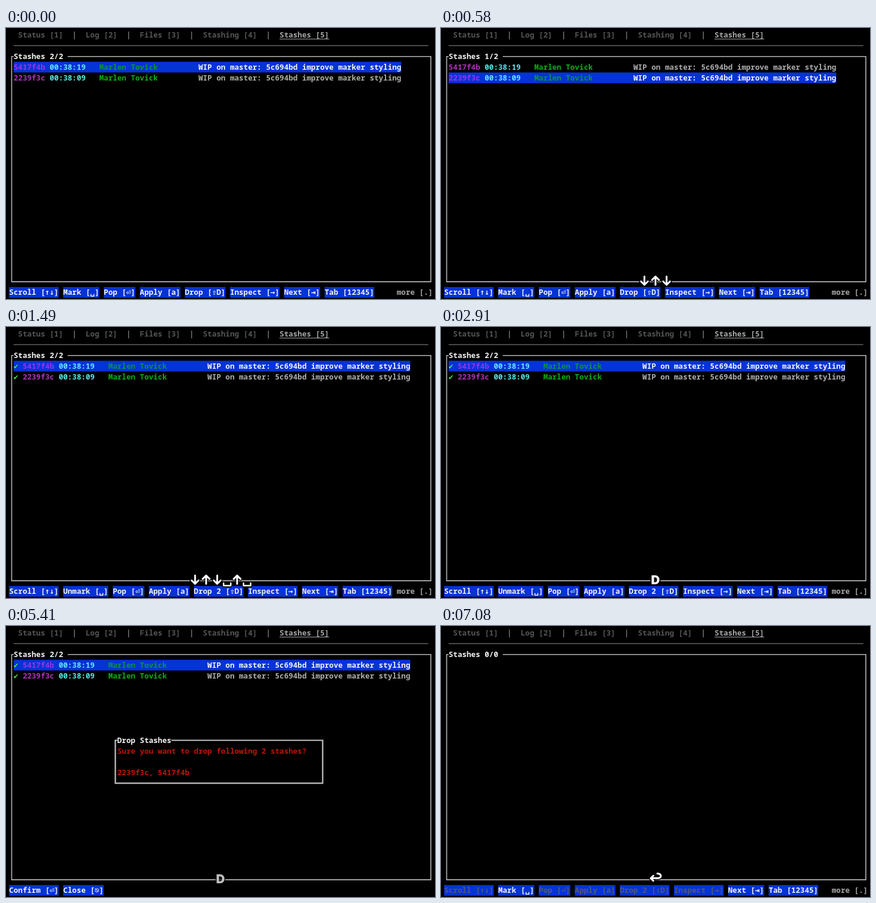
Write an HTML page with a canvas that moves like this. It is 720 px wide and 454 px high and loops after 7180 ms.

```html
<!DOCTYPE html>
<html lang="en">
<head>
<meta charset="utf-8">
<title>Stashes</title>
<style>
html, body { margin: 0; width: 100%; height: 100%; overflow: hidden; background: #000; }
canvas { display: block; }
</style>
</head>
<body>
<canvas id="stage" width="720" height="454"></canvas>
<script>
const ctx = document.getElementById('stage').getContext('2d');
const LOOP = 7180;
const CELL = 7.565, LEFT = 5.2, LINE = 17.97, TOP = 11.6;
const SYMBOL = /[↑↓␣⏎⇧→⇥⎋✔]/;
const BLUE = '#0433d6';

const STASHES = [
  { hash: '5417f4b', time: '00:38:19' },
  { hash: '2239f3c', time: '00:38:09' }
];
const AUTHOR = 'Marlen Tovick';
const MESSAGE = 'WIP on master: 5c694bd improve marker styling';

// Each step changes part of the state from its time on.
const START = { keys: '', sel: 0, marks: [false, false], popup: false, empty: false, fade: 1 };
const STEPS = [
  [80, { keys: '↓' }],
  [160, { sel: 1 }],
  [330, { keys: '↓↑' }],
  [410, { sel: 0 }],
  [500, { keys: '↓↑↓' }],
  [580, { sel: 1 }],
  [1000, { keys: '↓↑↓␣' }],
  [1080, { marks: [false, true] }],
  [1410, { keys: '↓↑↓␣↑', sel: 0 }],
  [1490, { keys: '↓↑↓␣↑␣', marks: [true, true] }],
  [2910, { keys: 'D' }],
  [2990, { popup: true }],
  [5410, { fade: 0.75 }],
  [5490, { fade: 0.5 }],
  [5580, { fade: 0.25 }],
  [5660, { keys: '', fade: 1 }],
  [6910, { keys: '⏎' }],
  [6990, { popup: false }],
  [7080, { empty: true }]
];

const colX = c => LEFT + c * CELL;
const rowY = r => TOP + r * LINE;

function stateAt(t) {
  return Object.assign({}, START, ...STEPS.filter(s => s[0] <= t).map(s => s[1]));
}

function text(str, col, row, color, weight = 600) {
  ctx.fillStyle = color;
  ctx.textAlign = 'center';
  [...str].forEach((ch, i) => {
    if (ch === ' ') return;
    ctx.font = SYMBOL.test(ch)
      ? '700 13px "DejaVu Sans Mono", monospace'
      : `${weight} 12.6px "Noto Sans Mono", "DejaVu Sans Mono", monospace`;
    ctx.fillText(ch, colX(col + i + 0.5), rowY(row) + 4.5);
  });
}

function fillCells(col, row, count, color) {
  ctx.fillStyle = color;
  ctx.fillRect(colX(col), rowY(row) - LINE / 2, count * CELL, LINE);
}

function line(points, color, width) {
  ctx.strokeStyle = color;
  ctx.lineWidth = width;
  ctx.lineCap = 'butt';
  ctx.lineJoin = 'miter';
  ctx.beginPath();
  points.forEach(p => ctx.lineTo(...p));
  ctx.stroke();
}

// Box outline with a gap in the top edge for its title.
function frame(c0, r0, c1, r1, title, gap, color, width) {
  const x0 = colX(c0 + 0.5) + 0.5, x1 = colX(c1 + 0.5) + 0.5;
  const y0 = rowY(r0) + 0.2, y1 = rowY(r1) + 0.2;
  line([[colX(c0 + 1), y0], [x0, y0], [x0, y1], [x1, y1], [x1, y0], [colX(c0 + 1 + gap), y0]], color, width);
  text(title, c0 + 1, r0, '#f4f4f4', 800);
}

function tabs() {
  const names = ['Status', 'Log', 'Files', 'Stashing', 'Stashes'];
  let col = 2;
  names.forEach((name, i) => {
    const label = `${name} [${i + 1}]`;
    const last = i === names.length - 1;
    text(label, col, 0, last ? '#a6a6a6' : '#555');
    if (last) {
      line([[colX(col), 18.5], [colX(col + label.length), 18.5]], '#a6a6a6', 1);
    } else {
      text('|', col + label.length + 2, 0, '#777');
    }
    col += label.length + 5;
  });
  line([[colX(1), 29.5], [colX(93), 29.5]], '#626262', 1.4);
}

function list(s) {
  const title = s.empty ? '0/0' : `${2 - s.sel}/2`;
  frame(0, 2, 93, 23, 'Stashes ' + title, 12, '#b4b4b4', 1.6);
  if (s.empty) return;
  const shift = s.marks.some(Boolean) ? 2 : 0;
  STASHES.forEach((item, i) => {
    const on = i === s.sel, row = 3 + i, col = 1 + shift;
    if (on) fillCells(1, row, 86 + shift, BLUE);
    if (s.marks[i]) text('✔', 1, row, '#48e64c');
    text(item.hash, col, row, on ? '#9a35e2' : '#b232bd');
    text(item.time, col + 8, row, on ? '#64e6ff' : '#55e6e6');
    text(AUTHOR, col + 19, row, on ? '#06963c' : '#08b014');
    text(MESSAGE, col + 41, row, on ? '#f2f2f2' : '#adadad');
  });
}

function commands(s) {
  const marked = s.marks.filter(Boolean).length;
  const live = !s.empty;
  const items = s.popup ? [['Confirm [⏎]', true], ['Close [⎋]', true]] : [
    ['Scroll [↑↓]', live],
    [live && s.marks[s.sel] ? 'Unmark [␣]' : 'Mark [␣]', true],
    ['Pop [⏎]', live],
    ['Apply [a]', live],
    [marked ? `Drop ${marked} [⇧D]` : 'Drop [⇧D]', live],
    ['Inspect [→]', live],
    ['Next [⇥]', true],
    ['Tab [12345]', true]
  ];
  let col = 0;
  for (const [label, on] of items) {
    fillCells(col, 24, label.length, BLUE);
    text(label, col, 24, on ? '#f2f2f2' : '#53587a');
    col += label.length + 1;
  }
  if (!s.popup) text('more [.]', 86, 24, '#a6a6a6');
}

function popup() {
  ctx.fillStyle = '#000';
  ctx.fillRect(colX(23), rowY(10) - 9, 47 * CELL, 5 * LINE);
  frame(23, 10, 69, 14, 'Drop Stashes', 12, '#c4c4c4', 2.2);
  text('Sure you want to drop following 2 stashes?', 24, 11, '#bd1408');
  text('2239f3c, 5417f4b', 24, 13, '#bd1408');
}

function keyPath(key, x) {
  ctx.beginPath();
  if (key === '↓' || key === '↑') {
    const d = key === '↓' ? 1 : -1, y = 423.3;
    ctx.moveTo(x, y - 7 * d);
    ctx.lineTo(x, y + 6.5 * d);
    ctx.moveTo(x - 5.8, y + 1.2 * d);
    ctx.lineTo(x, y + 7 * d);
    ctx.lineTo(x + 5.8, y + 1.2 * d);
  } else if (key === '␣') {
    ctx.moveTo(x - 6, 429);
    ctx.lineTo(x - 6, 433.3);
    ctx.lineTo(x + 6, 433.3);
    ctx.lineTo(x + 6, 429);
  } else {
    ctx.moveTo(x + 3, 414.8);
    ctx.bezierCurveTo(x + 11, 414.6, x + 11, 422.6, x + 3, 422.6);
    ctx.lineTo(x - 7.5, 422.6);
    ctx.moveTo(x - 3.5, 418.4);
    ctx.lineTo(x - 8, 422.6);
    ctx.lineTo(x - 3.5, 426.8);
  }
}

function overlay(keys, alpha) {
  const widthOf = k => k === '␣' ? 14.8 : 18.6;
  const all = [...keys];
  let x = 360 - all.reduce((sum, k) => sum + widthOf(k), 0) / 2;
  ctx.globalAlpha = alpha;
  ctx.lineCap = ctx.lineJoin = 'round';
  const placed = all.map(k => {
    const w = widthOf(k);
    x += w;
    return [k, x - w / 2];
  });
  for (const [color, extra] of [['#000', 3], ['#fff', 0]]) {
    ctx.strokeStyle = ctx.fillStyle = color;
    for (const [k, cx] of placed) {
      if (k === 'D') {
        ctx.font = '900 20.5px Inter, "Open Sans", sans-serif';
        ctx.textAlign = 'center';
        ctx.lineWidth = 4;
        if (extra) ctx.strokeText(k, cx, 431);
        ctx.fillText(k, cx, 431);
      } else {
        ctx.lineWidth = (k === '␣' ? 2.4 : 3) + extra;
        keyPath(k, cx);
        ctx.stroke();
      }
    }
  }
  ctx.globalAlpha = 1;
}

function draw(t) {
  const s = stateAt(t);
  ctx.fillStyle = '#000';
  ctx.fillRect(0, 0, 720, 454);
  tabs();
  list(s);
  commands(s);
  if (s.popup) popup();
  if (s.keys) overlay(s.keys, s.fade);
}

const begin = performance.now();
function tick() {
  draw((performance.now() - begin) % LOOP);
  requestAnimationFrame(tick);
}
tick();
</script>
</body>
</html>
```
